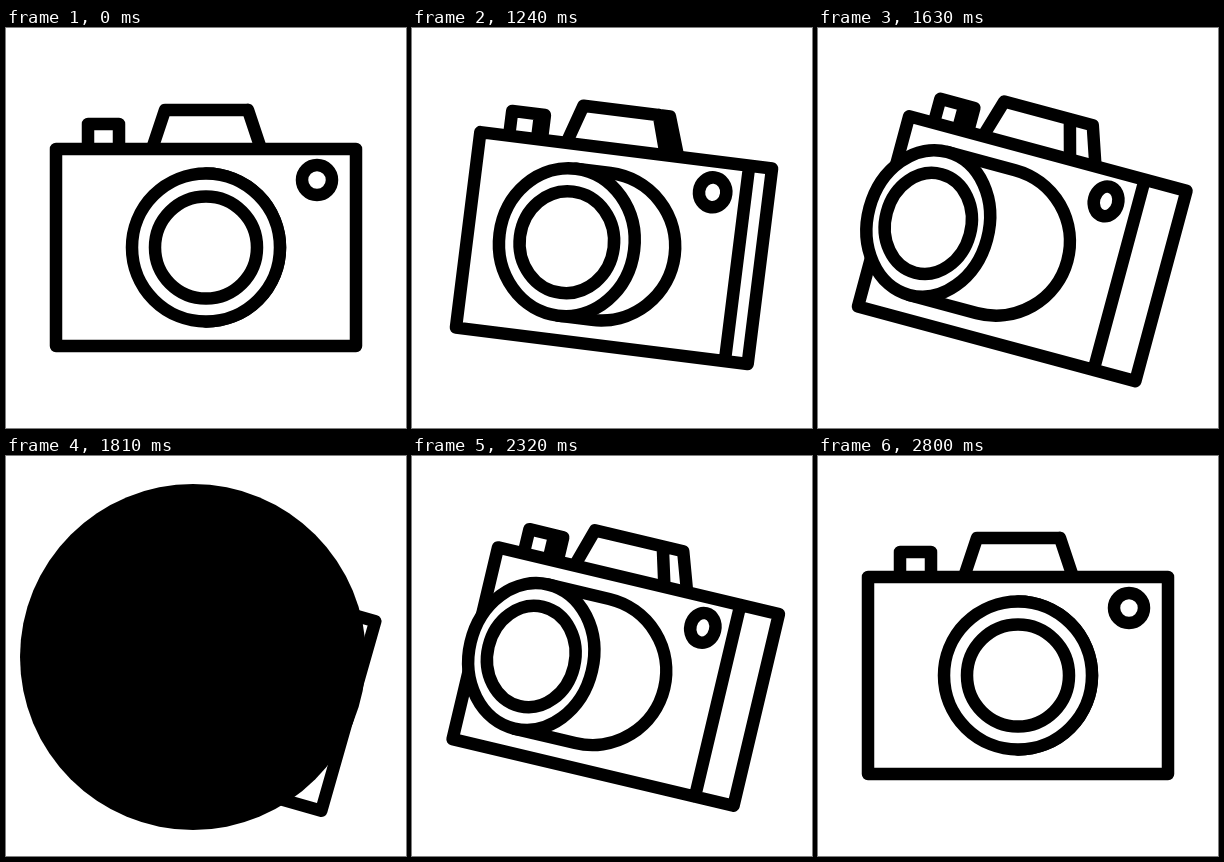
An HTML page for the animation above (2830 ms loop, 400x400 px).

```html
<!DOCTYPE html>
<html lang="en">
<head>
<meta charset="utf-8">
<title>Camera</title>
<style>
  html, body { margin: 0; width: 100%; height: 100%; overflow: hidden; background: #fff; }
  svg { display: block; width: 100%; height: 100%; }
  #camera { fill: #fff; stroke: #000; stroke-width: 12.5; stroke-linejoin: round; stroke-linecap: round; }
</style>
</head>
<body>
<svg viewBox="0 0 400 400">
  <g id="camera">
    <path id="finder"/>
    <path id="hump"/>
    <path id="body"/>
    <ellipse id="knob"/>
    <path id="barrel"/>
    <ellipse id="rim"/>
    <ellipse id="glass"/>
  </g>
  <circle id="flash"/>
</svg>
<script>
const LOOP = 2830, STEP = 30, FIRST = 1030;
const TURN_START = 1000, TURN_TIME = 900;
const HALF_H = 98.5, LENS_R = 74, TILT = 16;

const part = id => document.getElementById(id);
const clamp = v => Math.min(1, Math.max(0, v));
const mix = (a, b, k) => a + (b - a) * k;
const bezier = (a, b, s) => 3 * (1 - s) ** 2 * s * a + 3 * (1 - s) * s * s * b + s ** 3;
const line = points => "M" + points.map(p => p.join(" ")).join("L");

function set(id, attrs) {
  for (const name in attrs) part(id).setAttribute(name, attrs[name]);
}

// cubic-bezier(.25, .1, .25, 1)
function ease(x) {
  if (x <= 0 || x >= 1) return clamp(x);
  let low = 0, high = 1;
  for (let i = 0; i < 24; i++) {
    const mid = (low + high) / 2;
    if (bezier(.25, .25, mid) < x) low = mid; else high = mid;
  }
  return bezier(.1, 1, low);
}

// Turn: 0 faces the viewer, 1 is fully turned.
function turnAt(t) {
  const u = (t - TURN_START) / TURN_TIME;
  return ease(u < 1 ? u : 2 - u);
}

function flashAt(t) {
  const k = Math.min(clamp((t - 1640) / 150), clamp((2030 - t) / 150));
  return k * k * (3 - 2 * k);
}

function drawCamera(p) {
  const x = 200 + 4.5 * p, y = 219.5 + 1.3 * p, angle = TILT * p;
  set("camera", { transform: `translate(${x} ${y}) rotate(${angle})` });

  const w = 150 - 6.75 * p, edge = w - 53.5 * Math.sin(p), h = HALF_H;
  set("body", {
    d: line([[-w, -h], [w, -h], [w, h], [-w, h]]) + "Z" + line([[edge, -h], [edge, h]])
  });

  const fr = -87 + 4.5 * p, fi = -87 - 6.5 * p;
  set("finder", {
    d: line([[-118, -h], [-118, -123.5], [fr, -123.5], [fr, -h]]) +
       line([[fi, -123.5], [fi, -h]])
  });

  const top = -137.5;
  set("hump", {
    d: line([[-54 - 14 * p, -h], [-41 - 15.5 * p, top], [42 - 6.3 * p, top], [55 - 6 * p, -h]]) +
       line([[42 - 31.5 * p, top], [55 - 34 * p, -h]])
  });

  set("knob", { cx: 111 - 45 * p, cy: -67.5, rx: 15 - 3 * p, ry: 15 });

  const front = -(110 - 7 * p) * p, back = -29 * p;
  set("barrel", {
    d: `M${front} ${-LENS_R}L${back} ${-LENS_R}` +
       `A${LENS_R} ${LENS_R} 0 0 1 ${back} ${LENS_R}L${front} ${LENS_R}`
  });
  set("rim", { cx: front, cy: 0, rx: LENS_R - 14 * p, ry: LENS_R });
  set("glass", { cx: front, cy: 0, rx: 51 - 8.5 * p, ry: 51 });

  const a = angle * Math.PI / 180;
  return [x + front * Math.cos(a), y + front * Math.sin(a)];
}

function draw(time) {
  const now = time % LOOP;
  const t = now < FIRST ? 0 : FIRST + Math.floor((now - FIRST) / STEP) * STEP;
  const [lx, ly] = drawCamera(turnAt(t));
  const k = flashAt(t);
  set("flash", { cx: mix(lx, 187, k), cy: mix(ly, 201, k), r: 173 * k });
}

const start = performance.now();
function tick() {
  draw(performance.now() - start);
  requestAnimationFrame(tick);
}
tick();
</script>
</body>
</html>
```
